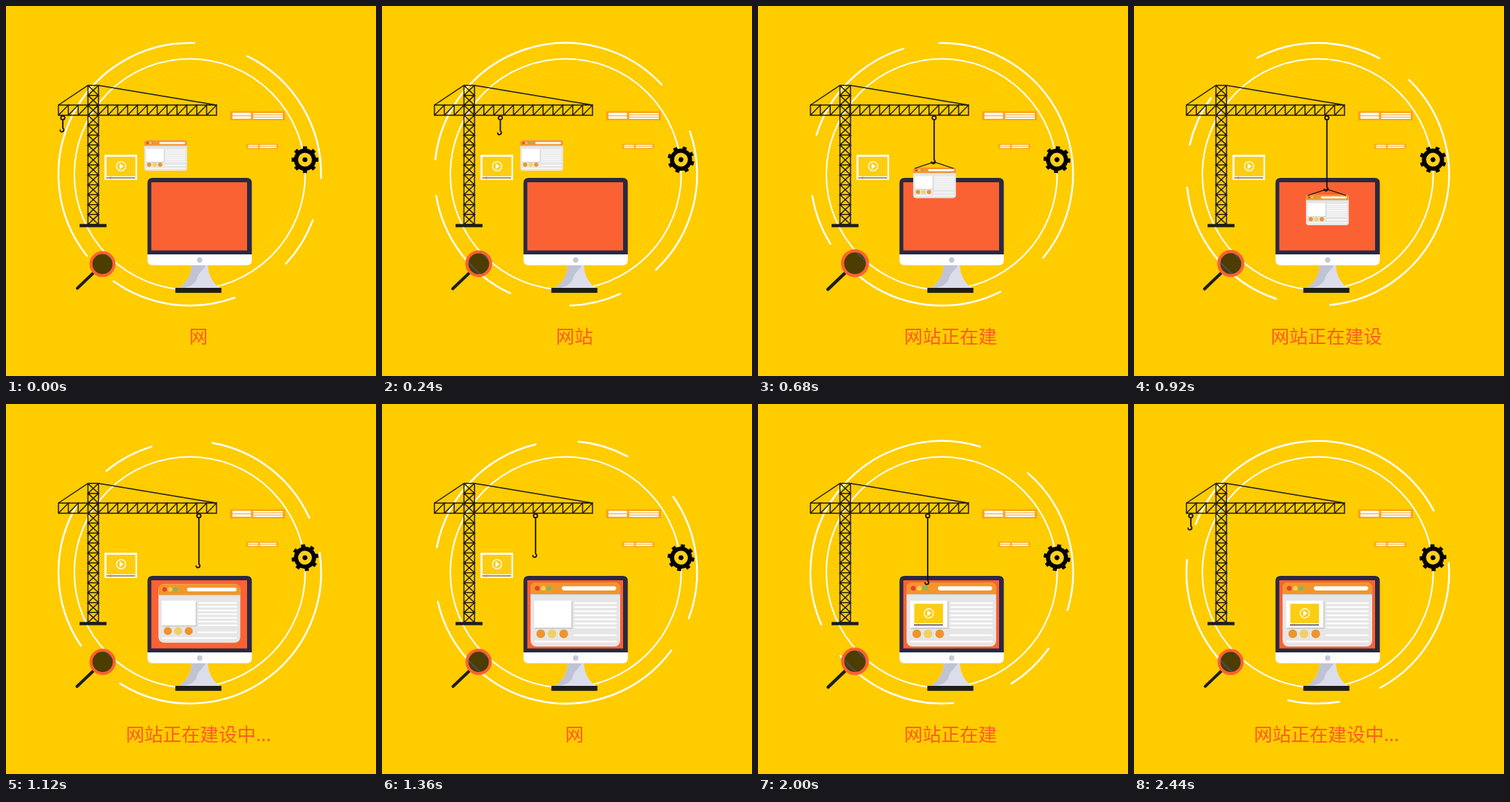
Animation of 508x508 px, one loop 2.48 s. Source, as an HTML page:

```html
<!DOCTYPE html>
<html lang="zh">
<head>
<meta charset="utf-8">
<title>Under construction</title>
<style>
  html, body { margin: 0; width: 100%; height: 100%; overflow: hidden; background: #fc0; }
  svg { display: block; width: 100vw; height: 100vh; }
  #label { font: 300 25.5px "Noto Sans CJK SC", "Noto Sans CJK", sans-serif; fill: #ff5a22; text-anchor: middle; }
  .line { fill: none; stroke: #1d1d1b; stroke-width: 1.5; }
  .hook { fill: none; stroke: #111; stroke-width: 1.8; stroke-linecap: round; }
</style>
</head>
<body>
<svg viewBox="0 0 508 508">
  <rect width="508" height="508" fill="#fc0"/>
  <g fill="none" stroke="#fff" stroke-linecap="round">
    <circle cx="252.3" cy="231" r="140" stroke="#ffd62e" stroke-width="1" stroke-dasharray="5 4" opacity=".6"/>
    <circle cx="252.3" cy="231" r="158.5" stroke-width="2"/>
    <path id="arcs" stroke-width="2.5"/>
  </g>

  <path id="crane" class="line"/>
  <rect x="101" y="299.3" width="37" height="4.4" fill="#1d1d1b"/>

  <g id="notes"></g>

  <g id="gear">
    <circle r="15.2"/>
    <g id="teeth"></g>
    <circle r="9.5" fill="#fdd01c"/>
    <circle r="3.3"/>
  </g>

  <g id="lens">
    <path d="M120.5 366 98 387.500" stroke="#1d1d1b" stroke-width="4" stroke-linecap="round"/>
    <circle cx="132.500" cy="354.300" r="15.800" fill="#000" fill-opacity=".7" stroke="#fb6233" stroke-width="4"/>
  </g>

  <path d="M255 355H277C278 371 284 381 295 388H235C248 381 254 371 255 355Z" fill="#dcddeb"/>
  <path d="M255 355H275C271 363 264 366 262 374 260 383 250 387 235 388 248 381 254 371 255 355Z" fill="#c0c2d5"/>
  <rect x="232.500" y="387" width="63.200" height="6.800" fill="#1d1d1b"/>
  <path d="M194.300 341V243Q194.300 236 201.300 236H330.500Q337.500 236 337.500 243V341Z" fill="#2a2843"/>
  <path d="M194.300 341H337.500V349Q337.500 356 330.500 356H201.300Q194.300 356 194.300 349Z" fill="#fff"/>
  <rect x="199.500" y="242" width="131.500" height="93.600" fill="#fb6233"/>
  <circle cx="265.900" cy="348.800" r="3.700" fill="#c6c8da"/>

  <g id="browser"></g>

  <g id="video">
    <path d="M135.300 204.300H180V238.800H135.300ZM138 207V233.600H177.500V207Z" fill="#fff" fill-rule="evenodd"/>
    <rect x="138" y="207" width="39.500" height="26.600" fill="#fdcd12"/>
    <path d="M137.500 236H177.500" stroke="#3a2a1a" stroke-width="1.200"/>
    <path d="M143.500 234.500V237.500" stroke="#f0602a" stroke-width="1.400"/>
    <circle cx="158" cy="220" r="6.300" fill="none" stroke="#fff" stroke-width="1.300"/>
    <path d="M156 215.800 161.300 220 156 224.200Z" fill="#fff"/>
  </g>

  <path id="slings" class="hook" style="stroke-width:1.300"/>
  <path id="rope" class="hook"/>
  <text id="label" x="264.300" y="462.700"></text>
</svg>
<script>
const LOOP = 2480, STEP = 40, BEAT = 1240;
const $ = id => document.getElementById(id);
const rect = (x, y, w, h, fill, r = 0) =>
  `<rect x="${x}" y="${y}" width="${w}" height="${h}" rx="${r}" fill="${fill}"/>`;
const dot = (x, y, r, fill) => `<circle cx="${x}" cy="${y}" r="${r}" fill="${fill}"/>`;

function drawCrane() {
  const top = 109, cell = 191 / 14, span = 217 / 16;
  let d = 'M112.500 109V300M127 109V300M72 136H289V150H72ZM72 136 112.500 109H127L289 136';
  for (let i = 0; i < 14; i++) {
    const a = top + i * cell, b = a + cell;
    d += `M112.500 ${a}L127 ${b}H112.500L127 ${a}`;
  }
  for (let i = 0; i < 16; i++) {
    const x = 72 + i * span;
    d += `M${x} 150L${x + span} 136V150`;
  }
  $('crane').setAttribute('d', d);
}

function drawNotes() {
  const amber = '#f9a51b';
  let s = rect(307.500, 144.500, 75.500, 12.500, amber) + rect(330.300, 189.300, 43, 7, amber);
  for (const y of [146.700, 151.300]) s += rect(311, y, 25.300, 3.500, '#fff');
  for (const y of [147, 150, 153]) s += rect(339.500, y, 40.500, 2, '#fff');
  for (const y of [190.700, 193.300]) s += rect(332.300, y, 14, 1.700, '#fff') + rect(348.300, y, 23, 1.700, '#fff');
  $('notes').innerHTML = s;
}

// Laid out at full size around its own centre.
function drawBrowser() {
  let s = rect(-61.500, -44, 123, 88, '#e6e6e7', 8);
  s += '<path d="M-61.500 -28V-36Q-61.500 -44 -53.500 -44H53.500Q61.500 -44 61.500 -36V-28Z" fill="#f3952a"/>';
  s += rect(-61.500, -28, 123, 1.300, '#cfcfd0');
  s += dot(-52.300, -36, 3.300, '#e5402f') + dot(-44, -36, 3.300, '#f3cf55') + dot(-36, -36, 3.300, '#7fba5c');
  s += rect(-18.500, -38.700, 74.500, 5.600, '#fff', 2.800);
  s += rect(-55.500, -17.800, 51.500, 37.500, '#c9c9ca') + rect(-56.500, -19, 51, 37, '#fff');
  for (let i = 0; i < 7; i++) s += rect(-1.500, -16.800 + i * 5.600, 58, 2.200, '#fff');
  s += rect(-2.500, 27.300, 59, 2.200, '#fff') + rect(-56.500, 36, 113, 2.200, '#fff');
  s += dot(-47.500, 26.500, 6, '#ef942a') + dot(-32, 26.500, 6, '#f0d066') + dot(-16, 26.500, 6, '#ef942a');
  $('browser').innerHTML = s;
}

function drawTeeth() {
  let s = '';
  for (let i = 0; i < 8; i++) s += `<rect x="-2.800" y="-18.300" width="5.600" height="6" transform="rotate(${i * 45})"/>`;
  $('teeth').innerHTML = s;
}

// Pairs of start and end angles, turned clockwise.
const ARCS = [[141.500, 272], [296, 361.700], [20.500, 43], [70, 125.500]];
function arcPath(turn) {
  const at = deg => {
    const a = (deg + turn) * Math.PI / 180;
    return `${252.300 + 180.300 * Math.cos(a)} ${231 + 180.300 * Math.sin(a)}`;
  };
  return ARCS.map(([a, b]) => `M${at(a)}A180.300 180.300 0 0 1 ${at(b)}`).join('');
}

// time, trolley x, hook y
const HOOK = [
  [0, 78, 172], [400, 218.800, 178.500], [440, 218.800, 178.500], [920, 264.800, 253], [1120, 264.800, 224],
  [1600, 156.800, 195.500], [1640, 156.800, 195.500], [1900, 233, 262.500], [2000, 233, 247],
  [2400, 78, 172], [2480, 78, 172]
];
const mix = (a, b, p) => a + (b - a) * p;
const clamp = p => Math.max(0, Math.min(1, p));
function hookAt(t) {
  const i = HOOK.findIndex(k => k[0] > t);
  const a = HOOK[i - 1], b = HOOK[i], p = (t - a[0]) / (b[0] - a[0]);
  return [mix(a[1], b[1], p), mix(a[2], b[2], p)];
}

const WORDS = [...'网站正在建设中', '...'];

function render(t) {
  const beat = t % BEAT;
  $('label').textContent = WORDS.slice(0, 1 + Math.floor(beat / 155)).join('');
  $('arcs').setAttribute('d', arcPath(t % 2120 * 0.1875));
  $('gear').setAttribute('transform', `translate(410.500 211) rotate(${beat / BEAT * 90})`);
  const pulse = 1 + 0.09 * (1 - Math.abs(beat / 620 - 1));
  $('lens').setAttribute('transform', `translate(124 368) scale(${pulse}) translate(-124 -368)`);

  const [x, y] = hookAt(t);
  $('rope').setAttribute('d',
    `M${x - 2.700} 153.500a2.700 2.700 0 1 1 5.400 0a2.700 2.700 0 1 1 -5.400 0M${x} 157V${y - 4.500}` +
    `c2 1.500 2 4.500 -.500 5c-2 .600 -3 -.500 -3.200 -2`);

  // The page is carried to the screen, then grows to fill it.
  const carry = clamp((t - 440) / 480), grow = clamp((t - 920) / 240);
  const bx = mix(219.300, 265.500, carry), by = mix(mix(205.200, 280, carry), 289, grow);
  $('browser').setAttribute('transform', `translate(${bx} ${by}) scale(${mix(0.478, 1, grow)})`);

  const lift = clamp((t - 1640) / 260);
  $('video').setAttribute('transform', `translate(${76.500 * lift} ${67.300 * lift})`);

  let slings = '';
  if (t >= 440 && t <= 920) slings = `M${x - 26} ${y + 7}L${x} ${y - 1.500}L${x + 26} ${y + 7}`;
  else if (t >= 1640 && t < 1900) slings = `M${x - 13.500} ${y + 8.500}L${x - 1} ${y - 1}L${x + 10.500} ${y + 8.500}`;
  $('slings').setAttribute('d', slings);
}

function tick() {
  const t = performance.now() % LOOP;
  render(Math.floor(t / STEP) * STEP);
  requestAnimationFrame(tick);
}

drawCrane();
drawNotes();
drawBrowser();
drawTeeth();
tick();
</script>
</body>
</html>
```
